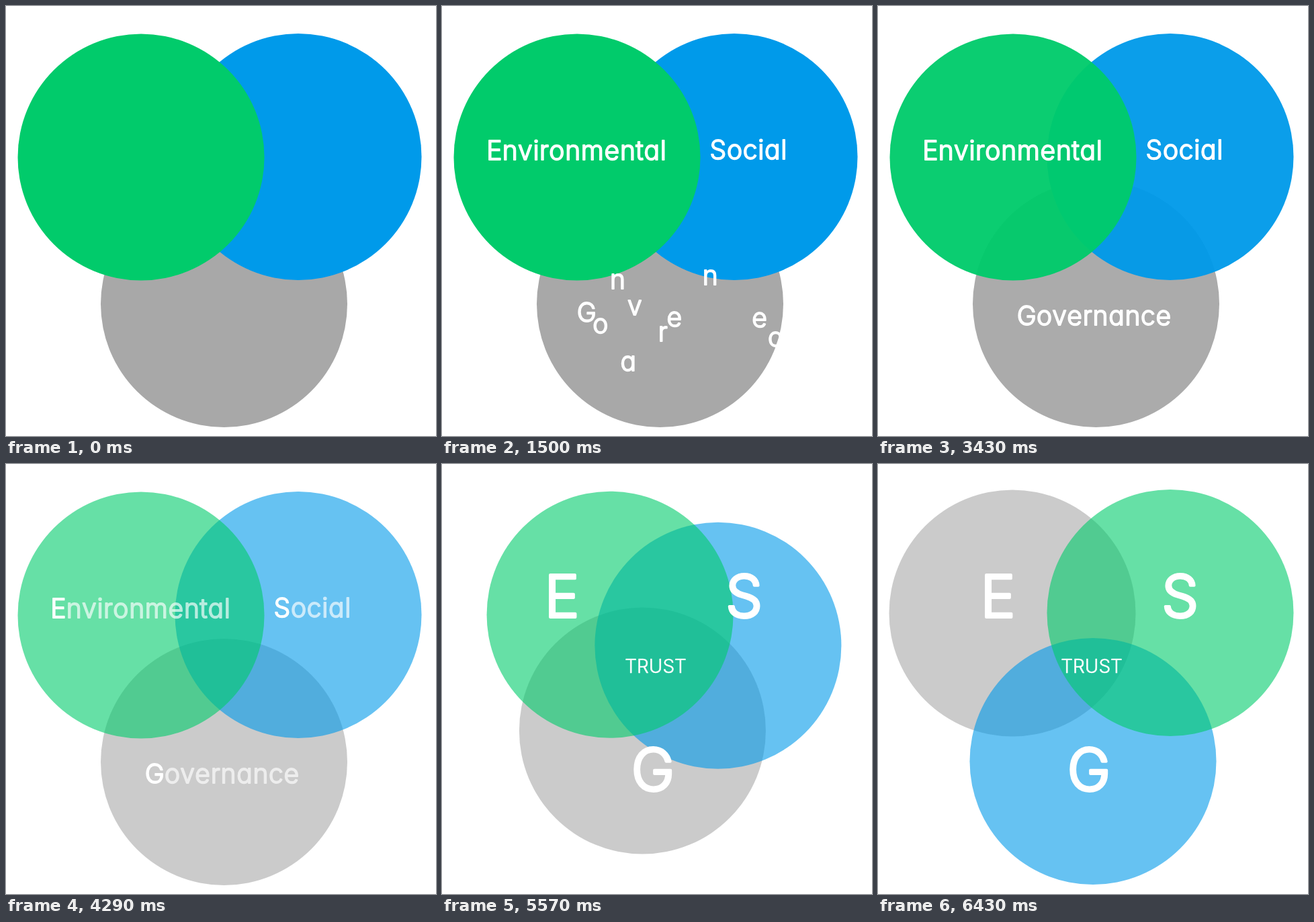
An HTML page that plays this animation: 640x640 px, repeating every 8000 ms.

```html
<!DOCTYPE html>
<html lang="en">
<head>
<meta charset="utf-8">
<title>Environmental, Social, Governance</title>
<style>
  html, body { margin: 0; width: 100%; height: 100%; overflow: hidden; background: #fff; }
  svg { display: block; width: 100vw; height: 100vh; }
  text {
    font: 300 39px Inter, Lato, sans-serif;
    font-feature-settings: "cv11";
    letter-spacing: .7px;
    text-anchor: middle;
    fill: #fff;
    stroke: #fff;
    stroke-width: 1.8px;
    stroke-linejoin: round;
  }
  .letter { letter-spacing: 0; }
  .trust { font-size: 28px; letter-spacing: 0; stroke-width: .6px; }
</style>
</head>
<body>
<svg id="stage" viewBox="0 0 640 640"></svg>
<script>
const LOOP = 8000, FPS = 14, FLIGHT = 600;
const stage = document.getElementById("stage");

// Back to front
const circles = [
  { fill: "#a8a8a8", from: [324.5, 443.5], to: [200, 222] },
  { fill: "#009aea", from: [435, 224.5], to: [320, 442.5] },
  { fill: "#01cb6b", from: [201, 225], to: [435, 221.5] }
];

// x, y: middle of the baseline; big: final place of the initial
const words = [
  { text: "Environmental", x: 200, y: 229, start: 600, step: 25, phase: 0, big: [178.5, 228] },
  { text: "Social", x: 456, y: 228, start: 600, step: 60, phase: .7, big: [449.5, 228] },
  { text: "Governance", x: 321.5, y: 474.5, start: 1000, step: 75, phase: -1.9, big: [314, 486] }
];

function add(tag, attrs, label) {
  const el = document.createElementNS("http://www.w3.org/2000/svg", tag);
  for (const key in attrs) el.setAttribute(key, attrs[key]);
  if (label) el.textContent = label;
  return stage.appendChild(el);
}

const mix = (a, b, p) => a + (b - a) * p;
const ramp = (t, start, length) => Math.min(1, Math.max(0, (t - start) / length));
const ease = (t, start, length) => (1 - Math.cos(Math.PI * ramp(t, start, length))) / 2;

// Sets a word as one line, then splits it into letters at their natural places
function split(word) {
  const line = add("text", { x: word.x, y: word.y }, word.text);
  const centres = [...word.text].map((char, i) => {
    const box = line.getExtentOfChar(i);
    return box.x + box.width / 2;
  });
  line.remove();
  return centres.map((x, i) => ({
    el: add("text", { class: "letter" }, word.text[i]),
    x,
    y: word.y,
    dx: 95 * Math.sin(1.2 * i + word.phase),
    dy: 70 * Math.cos(2.6 * (i - 6)),
    appear: 10 + i * 20,
    start: word.start + word.step * i,
    big: i === 0 ? word.big : null
  }));
}

for (const c of circles) c.el = add("circle", { r: 183.5, fill: c.fill });
const letters = words.flatMap(split);
const trust = add("text", { class: "trust", x: 318, y: 311 }, "TRUST");

function drawLetter(l, t) {
  const away = 1 - ease(t, l.start, FLIGHT);
  let x = l.x + l.dx * away;
  let y = l.y + l.dy * away;
  let scale = 1;
  let opacity = ramp(t, l.appear, 250);
  if (l.big) {
    const p = ease(t, 4400, 850);
    x = mix(x, l.big[0], p);
    y = mix(y, l.big[1], p);
    scale = mix(1, 2.22, p);
  } else {
    opacity *= 1 - ease(t, 3890, 1000);
  }
  l.el.setAttribute("transform", `translate(${x} ${y}) scale(${scale})`);
  l.el.setAttribute("opacity", opacity);
}

function draw(t) {
  const move = ease(t, 5206, 1207);
  const alpha = mix(1, .6, ease(t, 3220, 1000));
  for (const c of circles) {
    c.el.setAttribute("cx", mix(c.from[0], c.to[0], move));
    c.el.setAttribute("cy", mix(c.from[1], c.to[1], move));
    c.el.setAttribute("fill-opacity", alpha);
  }
  for (const l of letters) drawLetter(l, t);
  trust.setAttribute("opacity", ease(t, 4800, 500));
}

// The motion runs in steps of 14 per second
const begin = performance.now();
function tick() {
  const t = (performance.now() - begin) % LOOP;
  draw(Math.floor((t + 5) * FPS / 1000) * 1000 / FPS);
  requestAnimationFrame(tick);
}
tick();
</script>
</body>
</html>
```
